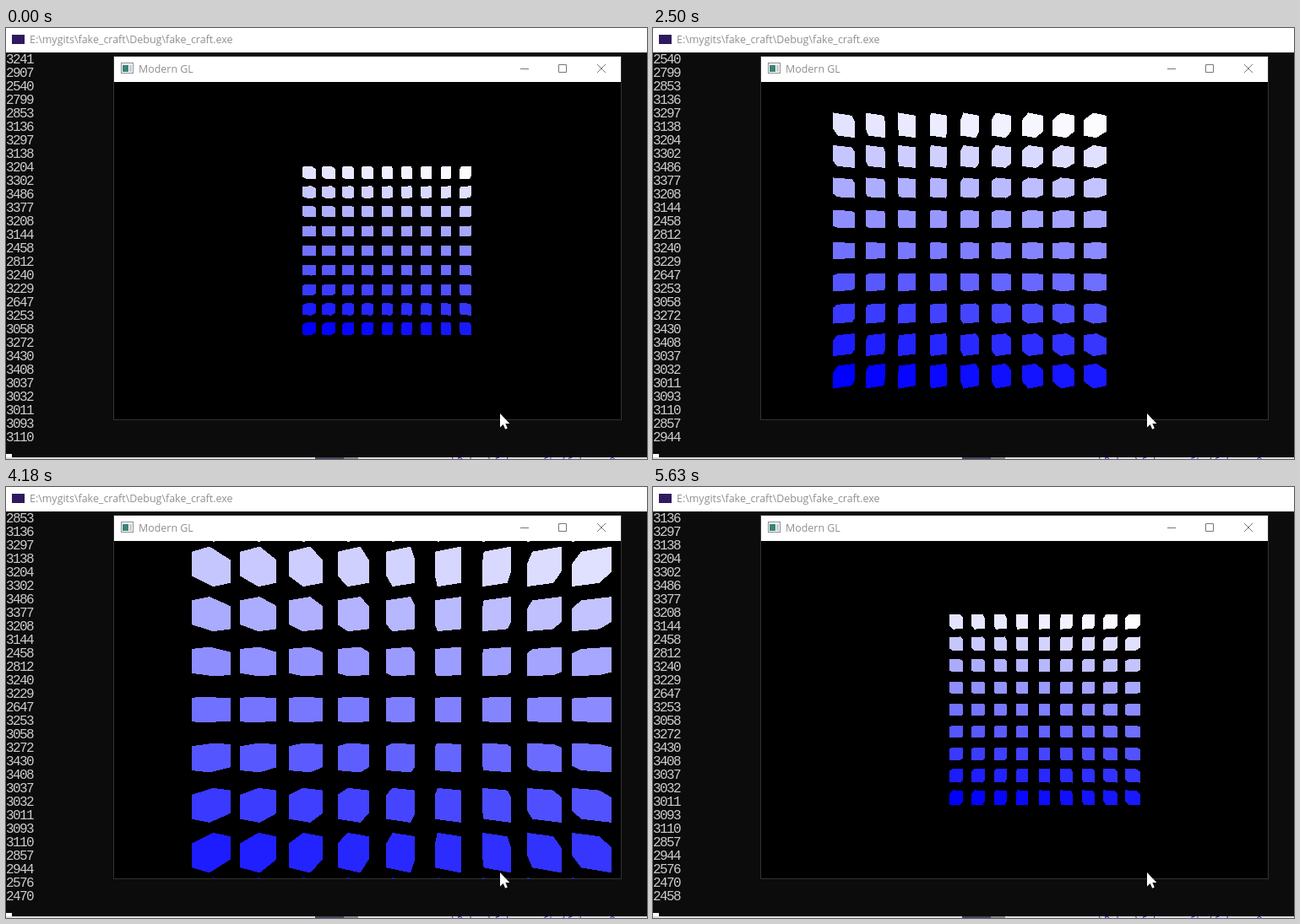
Write an HTML page with a canvas that moves like this. It is 759 by 511 pixels and loops after 5650 ms.

```html
<!DOCTYPE html>
<html lang="en">
<head>
<meta charset="utf-8">
<title>Modern GL</title>
<style>
  html, body { margin: 0; width: 100%; height: 100%; overflow: hidden; background: #0c0c0c; }
  #stage { position: relative; width: 759px; height: 511px; overflow: hidden; background: #0c0c0c; }
  #stage > * { position: absolute; }
  #log {
    left: 0; top: 30px; margin: 0; color: #ccc;
    font: 16px/16px "Liberation Mono", monospace; letter-spacing: -1.6px;
  }
  #view { left: 128px; top: 64px; background: #000; }
  svg { left: 0; top: 0; }
  svg text { font: 12.45px "Open Sans", "Noto Sans", sans-serif; fill: #8f8f8f; }
  svg .peek { font: 12px "Liberation Mono", monospace; fill: #6a1fc0; }
</style>
</head>
<body>
<div id="stage">
  <pre id="log"></pre>
  <canvas id="view" width="600" height="400"></canvas>
  <svg width="759" height="511">
    <!-- console frame -->
    <rect width="759" height="29" fill="#fff"/>
    <rect x="7" y="8" width="15" height="11" fill="#2f1a5f"/>
    <text x="28" y="18">E:\mygits\fake_craft\Debug\fake_craft.exe</text>
    <rect y="505" width="7" height="4" fill="#fff"/>
    <rect y="509" width="759" height="2" fill="#dcdce2"/>
    <rect x="366" y="509" width="34" height="2" fill="#44445e"/>
    <rect x="400" y="509" width="17" height="2" fill="#85858f"/>
    <text class="peek" x="527" y="518">\Debug\fake_craft (fake_c.Cpp</text>
    <!-- window frame -->
    <rect x="127.5" y="33.5" width="601" height="431" fill="none" stroke="#333"/>
    <rect x="128" y="34" width="600" height="30" fill="#fff"/>
    <g shape-rendering="crispEdges">
      <rect x="136.5" y="41.5" width="14" height="12" fill="#fff" stroke="#8a8f96"/>
      <rect x="138" y="44" width="7" height="8" fill="#3d8577"/>
      <rect x="146" y="44" width="3" height="8" fill="#c9ced3"/>
    </g>
    <text x="157" y="53">Modern GL</text>
    <g fill="none" stroke="#777">
      <path d="M609 48.5h10M654.5 43.5h9v9h-9z"/>
      <path d="M700 43l10 10M710 43l-10 10"/>
    </g>
    <path d="M585 457v16.5l3.7-3.4 2.5 5.6 2.6-1.2-2.4-5.4h5z" fill="#fff"/>
  </svg>
</div>
<script>
const LOOP = 5650;
const STEPS = [
  0, 120, 240, 360, 510, 630, 780, 930, 1050, 1170, 1290, 1410, 1560, 1690, 1810,
  1960, 2080, 2200, 2350, 2500, 2620, 2740, 2860, 2980, 3100, 3250, 3400,
  3540, 3660, 3780, 3910, 4030, 4180, 4300, 4420, 4540, 4680,
  4840, 4960, 5080, 5200, 5350, 5510, 5630
];
const PRINTS = [930, 1960, 2860, 3910, 4840];
const ROWS = 29;
const VALUES = (
  "3241 2907 2540 2799 2853 3136 3297 3138 3204 3302 3486 3377 3208 3144 2458 2812 3240 " +
  "3229 2647 3253 3058 3272 3430 3408 3037 3032 3011 3093 3110 2857 2944 2576 2470 2458"
).split(" ");

const W = 600, H = 400, FOCAL = 314, N = 9, HALF = 0.25;
const ctx = document.getElementById("view").getContext("2d");
const log = document.getElementById("log");

// Cube corners are numbered by sign bits; an edge joins corners one bit apart.
const EDGES = [];
for (let a = 0; a < 8; a++)
  for (const bit of [1, 2, 4]) if (!(a & bit)) EDGES.push([a, a | bit]);

function camera(t) {
  const phase = 2 * Math.PI / 6 * (t - 0.71);
  return {
    x: 1.5 * Math.sin(phase),
    z: 9.96 + 4.95 * Math.cos(phase),
    spin: (76 - 238.3 * t) * Math.PI / 180
  };
}

function corners(cx, cy, cam) {
  const c = Math.cos(cam.spin), s = Math.sin(cam.spin), pts = [];
  for (let i = 0; i < 8; i++) {
    const x = i & 1 ? HALF : -HALF, y = i & 2 ? HALF : -HALF, z = i & 4 ? HALF : -HALF;
    const k = FOCAL / (cam.z - (z * c - x * s));
    pts.push([W / 2 + (cx - cam.x + x * c + z * s) * k, H / 2 - (cy + y) * k]);
  }
  return pts;
}

// Fill the silhouette row by row, so edges stay hard.
function fillSolid(pts) {
  const ys = pts.map(p => p[1]);
  const top = Math.max(0, Math.round(Math.min(...ys)));
  const bottom = Math.min(H, Math.round(Math.max(...ys)));
  for (let row = top; row < bottom; row++) {
    const y = row + 0.5;
    let left = Infinity, right = -Infinity;
    for (const [a, b] of EDGES) {
      const [x0, y0] = pts[a], [x1, y1] = pts[b];
      if ((y0 <= y) === (y1 <= y)) continue;
      const x = x0 + (x1 - x0) * (y - y0) / (y1 - y0);
      left = Math.min(left, x);
      right = Math.max(right, x);
    }
    if (right > left) {
      const x = Math.round(left);
      ctx.fillRect(x, row, Math.round(right) - x, 1);
    }
  }
}

function drawCubes(t) {
  const cam = camera(t), mid = (N - 1) / 2;
  ctx.fillStyle = "#000";
  ctx.fillRect(0, 0, W, H);
  for (let j = 0; j < N; j++)
    for (let i = 0; i < N; i++) {
      const v = Math.round(255 * (j * N + i) / (N * N));
      ctx.fillStyle = `rgb(${v},${v},255)`;
      fillSolid(corners(i - mid, j - mid, cam));
    }
}

function drawLog(ms) {
  const first = PRINTS.filter(p => p <= ms).length;
  log.textContent = VALUES.slice(first, first + ROWS).join("\n");
}

let shown = -1;
const start = performance.now();
function tick() {
  const ms = (performance.now() - start) % LOOP;
  const step = STEPS.filter(s => s <= ms).pop() || 0;
  if (step !== shown) {
    shown = step;
    drawCubes(step / 1000);
    drawLog(step);
  }
  requestAnimationFrame(tick);
}
tick();
</script>
</body>
</html>
```
